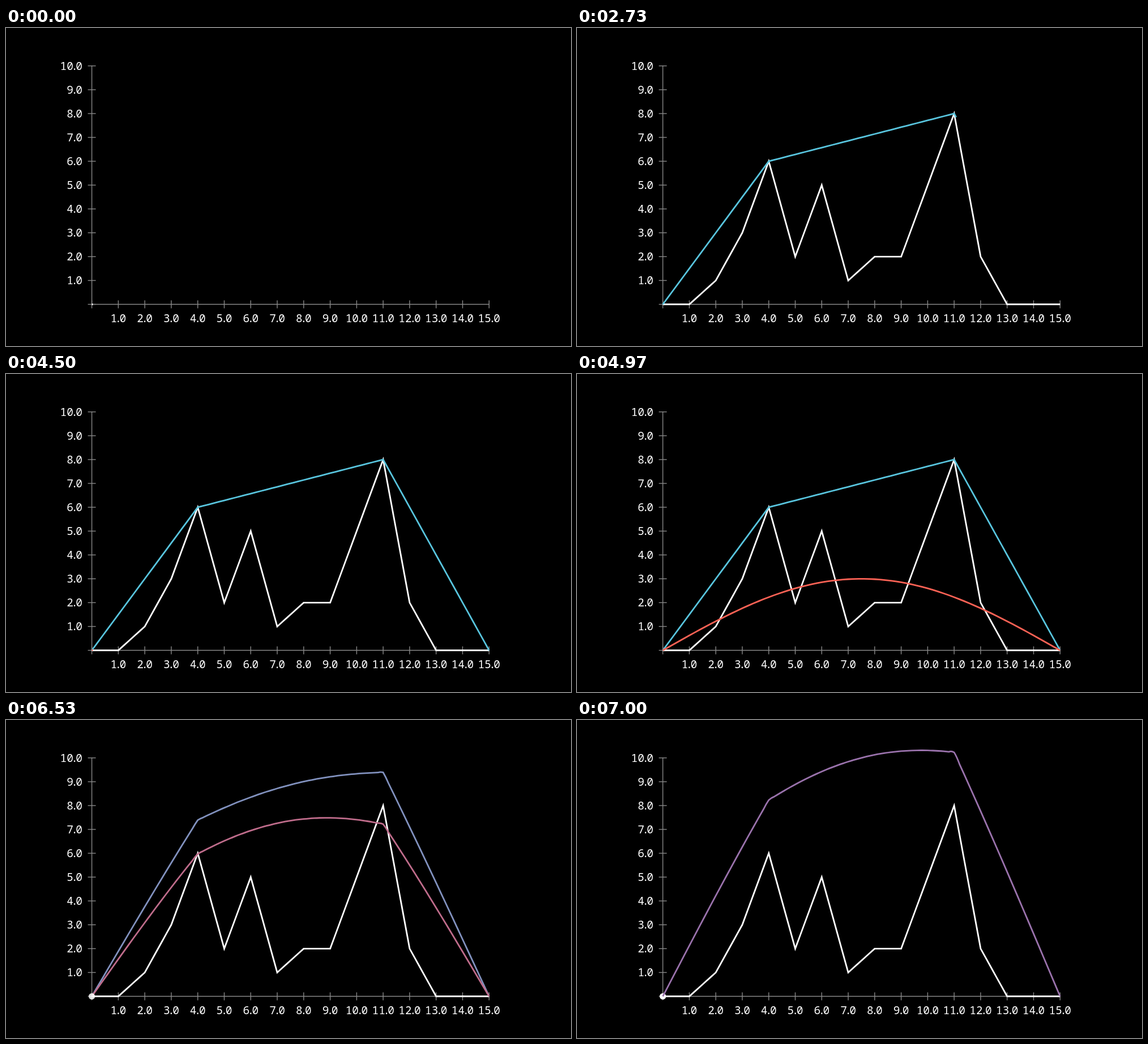
These frames come from a looping animation (998 px wide and 561 px high, 8 s). An HTML page with a canvas:

```html
<!DOCTYPE html>
<html lang="en">
<head>
<meta charset="utf-8">
<title>Adding two graphs</title>
<style>
  html, body { margin: 0; width: 100%; height: 100%; overflow: hidden; background: #000; }
  canvas { display: block; }
</style>
</head>
<body>
<canvas id="stage" width="998" height="561"></canvas>
<script>
const ctx = document.getElementById('stage').getContext('2d');

const LOOP = 8000, FPS = 30;
const ORIGIN = { x: 151.6, y: 487.5 }, UNIT = { x: 46.78, y: 42.07 };
const X_MAX = 15, Y_MAX = 10, STEP = 0.2, SAMPLES = 75;
const BLUE = [88, 196, 221], RED = [252, 98, 85], PURPLE = [154, 114, 172];

const px = x => ORIGIN.x + x * UNIT.x;
const py = y => ORIGIN.y - y * UNIT.y;
const lerp = (a, b, t) => a + (b - a) * t;
const rgb = c => `rgb(${c.map(Math.round).join()})`;
const mix = (a, b, t) => rgb(a.map((v, i) => lerp(v, b[i], t)));

function smooth(t) {
  t = Math.min(1, Math.max(0, t));
  const s = 1 - t;
  return t ** 3 * (10 * s * s + 5 * s * t + t * t);
}

// Piecewise linear function through the given points
const linear = points => x => {
  let i = 1;
  while (i < points.length - 1 && x > points[i][0]) i++;
  const [x0, y0] = points[i - 1], [x1, y1] = points[i];
  return lerp(y0, y1, (x - x0) / (x1 - x0));
};

const data = linear([0, 0, 1, 3, 6, 2, 5, 1, 2, 2, 5, 8, 2, 0, 0, 0].map((y, x) => [x, y]));
const hull = linear([[0, 0], [4, 6], [11, 8], [15, 0]]);
const wave = x => 3 * Math.sin(Math.PI * x / X_MAX);
const sum = x => hull(x) + wave(x);

function segment(x0, y0, x1, y1) {
  ctx.beginPath();
  ctx.moveTo(x0, y0);
  ctx.lineTo(x1, y1);
  ctx.stroke();
}

// A number with one decimal, its point set tightly between the digits
function label(value, x, y, alignRight) {
  const digit = 10.3, dot = 3, gap = 1.4;
  const chars = value.toFixed(1).split('');
  const widths = chars.map(c => c === '.' ? dot : digit);
  const total = widths.reduce((a, b) => a + b + gap);
  let left = alignRight ? x - total : x - total / 2;
  chars.forEach((c, i) => {
    ctx.fillText(c, left + widths[i] / 2, y + 7);
    left += widths[i] + gap;
  });
}

function drawAxes() {
  const tick = 7;
  ctx.strokeStyle = '#888';
  ctx.lineWidth = 1.4;
  ctx.fillStyle = '#fff';
  ctx.font = '500 19.5px "Noto Sans Mono", monospace';
  ctx.textAlign = 'center';
  segment(px(0), py(0), px(X_MAX), py(0));
  segment(px(0), py(0), px(0), py(Y_MAX));
  for (let x = 0; x <= X_MAX; x++) {
    segment(px(x), py(0) - tick, px(x), py(0) + tick);
    if (x) label(x, px(x), 512);
  }
  for (let y = 0; y <= Y_MAX; y++) {
    segment(px(0) - tick, py(y), px(0) + tick, py(y));
    if (y) label(y, 134.3, py(y), true);
  }
}

// Graph of f from zero up to a fraction of the x axis
function trace(f, part, color) {
  const end = part * X_MAX;
  if (end <= 0) return;
  ctx.strokeStyle = color;
  ctx.lineWidth = 2.8;
  ctx.beginPath();
  ctx.moveTo(px(0), py(f(0)));
  for (let i = 1; i * STEP < end; i++) ctx.lineTo(px(i * STEP), py(f(i * STEP)));
  ctx.lineTo(px(end), py(f(end)));
  ctx.stroke();
}

// Graph of f on its way to the smoothed sum
function morph(f, t, color) {
  ctx.strokeStyle = color;
  ctx.lineWidth = 2.8;
  ctx.beginPath();
  ctx.moveTo(px(0), py(0));
  for (let i = 0; i < SAMPLES; i++) {
    const x = i * STEP, next = x + STEP;
    const [a, b, c, d] = [-1, 0, 1, 2].map(k => sum((i + k) * STEP));
    const bend = (b + (c - a) / 4 + c - (d - b) / 4) / 2;
    const handle = lerp((f(x) + f(next)) / 2, bend, t);
    ctx.quadraticCurveTo(px(x + STEP / 2), py(handle), px(next), py(lerp(f(next), c, t)));
  }
  ctx.stroke();
}

function drawDot(alpha) {
  ctx.fillStyle = `rgba(255,255,255,${alpha})`;
  ctx.beginPath();
  ctx.arc(px(0), py(0), 5.6, 0, 2 * Math.PI);
  ctx.fill();
}

function draw(ms) {
  const frame = Math.floor((ms + 4) * FPS / 1000);
  const progress = (start, length) => smooth((frame - start) / length);
  ctx.fillStyle = '#000';
  ctx.fillRect(0, 0, 998, 561);
  drawAxes();
  trace(data, progress(-1, 15), '#fff');

  const t = progress(179, 30);
  if (t === 0) {
    trace(hull, progress(44, 60), rgb(BLUE));
    trace(wave, progress(134, 15), rgb(RED));
    return;
  }
  const merged = frame >= 210;
  if (!merged) {
    morph(hull, t, mix(BLUE, PURPLE, t));
    morph(wave, t, mix(RED, PURPLE, t));
  }
  drawDot(1 - (1 - t) ** 2);
  if (merged) morph(hull, 1, rgb(PURPLE));
}

const begin = performance.now();
function loop() {
  draw((performance.now() - begin) % LOOP);
  requestAnimationFrame(loop);
}
loop();
</script>
</body>
</html>
```
